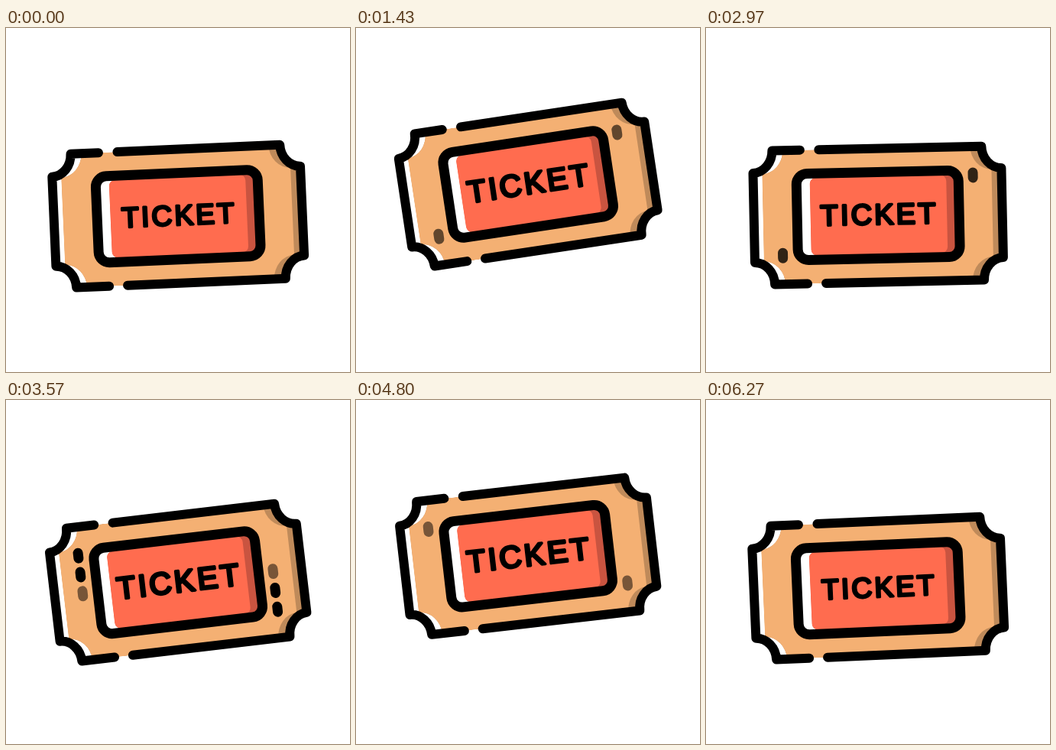
An HTML page that plays this animation: 450x450 px, repeating every 6.31 s.

```html
<!DOCTYPE html>
<html lang="en">
<head>
<meta charset="utf-8">
<title>Ticket</title>
<style>
  html, body { margin: 0; width: 100%; height: 100%; overflow: hidden; background: #fff; }
  svg { display: block; width: 100%; height: 100%; }
  text { font: 37px "Liberation Sans", Arial, sans-serif; letter-spacing: 3.2px; }
</style>
</head>
<body>
<svg viewBox="0 0 450 450">
  <defs>
    <path id="body" d="M-162.5-58.5A26 29 0 0 0-137-87.5H137A26 29 0 0 0 162.5-58.5V58.5A26 29 0 0 0 137 87.5H-137A26 29 0 0 0-162.5 58.5Z"/>
    <path id="face" d="M-162.5-57A28 31 0 0 0-135-87.5H135A28 31 0 0 0 162.5-57V57A28 31 0 0 0 135 87.5H-135A28 31 0 0 0-162.5 57Z"/>
    <rect id="panel" x="-106" y="-56.5" width="212" height="113" rx="14"/>
    <rect id="inset" x="-101" y="-51" width="202" height="102" rx="8"/>
    <clipPath id="bodyClip"><use href="#body"/></clipPath>
    <clipPath id="faceClip"><use href="#face"/></clipPath>
    <clipPath id="insetClip"><use href="#inset"/></clipPath>
  </defs>
  <g id="ticket" stroke-linecap="round" stroke-linejoin="round">
    <g clip-path="url(#bodyClip)">
      <g transform="translate(12)" clip-path="url(#faceClip)">
        <use href="#body" fill="#bf8a5a"/>
        <use href="#face" x="-25" fill="#f4b073"/>
      </g>
    </g>
    <use href="#panel" fill="#fff"/>
    <g clip-path="url(#insetClip)">
      <g transform="translate(12.5)" clip-path="url(#insetClip)">
        <use href="#inset" fill="#c95440"/>
        <use href="#inset" x="-23.5" fill="#ff6c4f"/>
      </g>
    </g>
    <use href="#panel" fill="none" stroke="#000" stroke-width="13"/>
    <g fill="none" stroke="#000" stroke-width="12">
      <path d="M-100.5-87.5H-137A26 29 0 0 1-162.5-58.5V58.5A26 29 0 0 1-137 87.5H-94"/>
      <path d="M-76-87.5H137A26 29 0 0 0 162.5-58.5V58.5A26 29 0 0 0 137 87.5H-70"/>
    </g>
    <g id="dots" stroke="#000" stroke-width="13"></g>
    <g id="label">
      <text x="-73.5" y="12.5" stroke="#000" stroke-width="3.2">TICKET</text>
    </g>
  </g>
</svg>
<script>
  const LOOP = 6310;
  const FRAME = 100 / 3;
  const LAST = 188;              // closing pose equals the opening one
  const SPAN = LAST * FRAME;
  const SWAY = SPAN / 2;
  const BLINK = SPAN / 4;
  const PULSE = SPAN / 6;
  const FADE = 5 * FRAME;
  const DOTS = 5;

  const byId = id => document.getElementById(id);
  const ticket = byId('ticket');
  const label = byId('label');
  const clamp = v => Math.max(0, Math.min(1, v));
  const wave = (t, period) => Math.cos(2 * Math.PI * t / period);

  function addDot(x, y) {
    const dot = document.createElementNS('http://www.w3.org/2000/svg', 'path');
    dot.setAttribute('d', `M${x} ${y - 3.5}v7`);
    byId('dots').append(dot);
    return dot;
  }

  // Left column runs downwards, right column upwards.
  const pairs = Array.from({ length: DOTS }, (_, i) => {
    const y = (i - 2) * 25;
    return [addDot(-125.7, y), addDot(125, -y)];
  });

  function dotOpacity(t, i) {
    const local = t % BLINK - i * FADE;
    return clamp((local - 15) / FADE) * clamp(1 - (local - 700) / FADE);
  }

  function render(ms) {
    const t = Math.min(LAST, Math.floor((ms % LOOP + 5) / FRAME)) * FRAME;
    const y = 225 + 21.2 * wave(t, SWAY);
    const angle = -5 - 5 * wave(t - SWAY / 3, SWAY);
    const scale = 1.05 - 0.05 * wave(t, PULSE);

    ticket.setAttribute('transform', `translate(225.2 ${y}) rotate(${angle})`);
    label.setAttribute('transform', `translate(-0.5 -1) scale(${scale})`);
    pairs.forEach((pair, i) => {
      const opacity = dotOpacity(t, i);
      pair.forEach(dot => dot.setAttribute('opacity', opacity));
    });
  }

  const start = performance.now();
  function tick() {
    render(performance.now() - start);
    requestAnimationFrame(tick);
  }
  tick();
</script>
</body>
</html>
```
